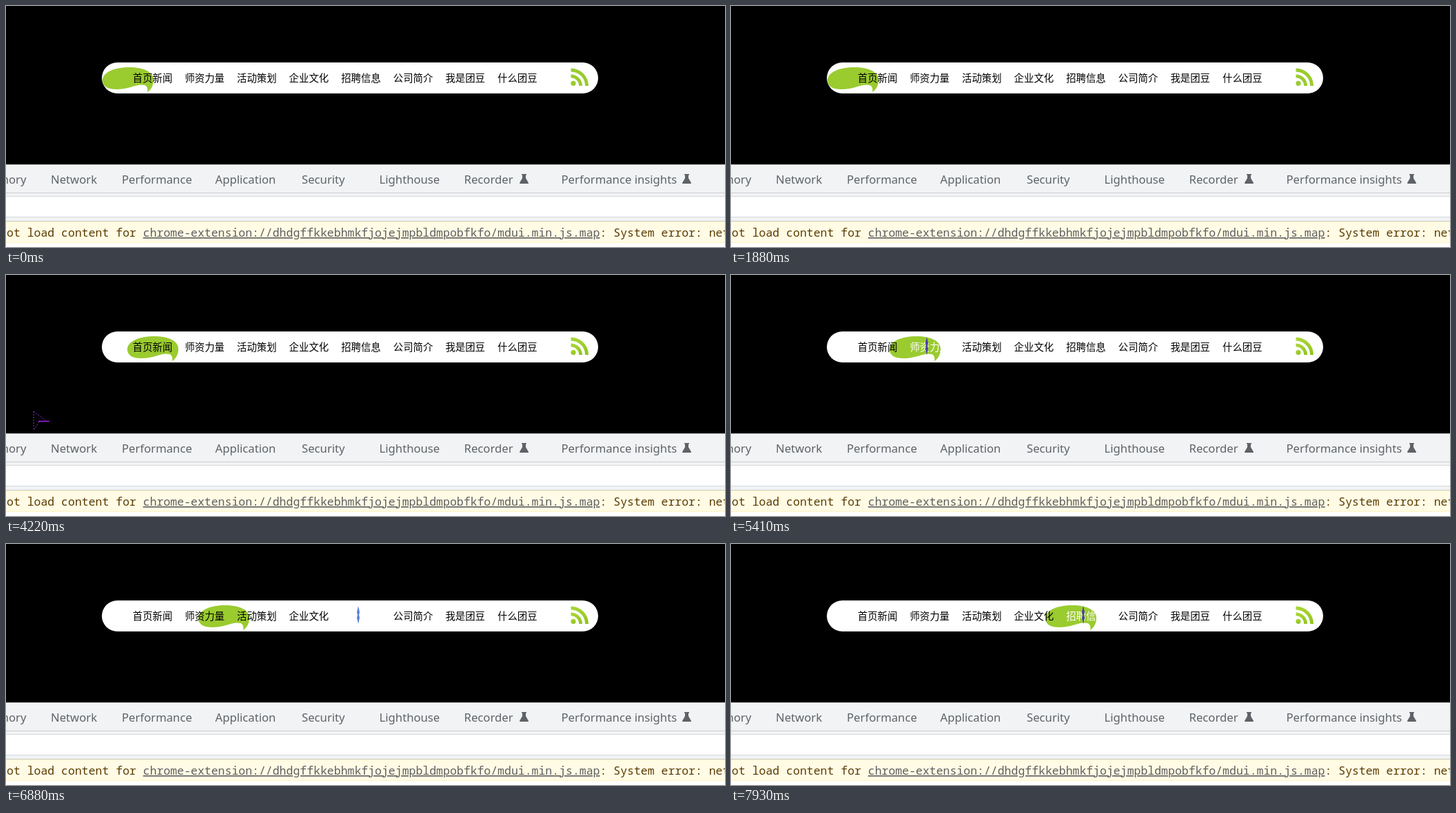
An HTML page for the animation above (8 s loop, 1043 by 350 pixels).

```html
<!DOCTYPE html>
<html lang="zh-CN">
<head>
<meta charset="utf-8">
<title>Navigation bar</title>
<style>
  html, body { margin: 0; width: 100%; height: 100%; overflow: hidden; background: #000; }
  svg { display: block; width: 1043px; height: 350px; }
  text { white-space: pre; }
  #nav { font: 350 14.4px "Noto Sans CJK SC", "Noto Sans CJK", sans-serif; }
  #tabs { font: 16.7px "Noto Sans", "Open Sans", sans-serif; fill: #5f6368; }
  #log text { font: 16.49px "Noto Sans Mono", "DejaVu Sans Mono", monospace; fill: #5c3c00; }
  #log .link { fill: #5f5f5f; text-decoration: underline 1px; }
  .line { fill: #cacdd1; }
</style>
</head>
<body>
<svg viewBox="0 0 1043 350">
  <defs>
    <linearGradient id="shine" x1="0" y1="0" x2="0" y2="1">
      <stop offset="0" stop-color="#a9d637"/>
      <stop offset="1" stop-color="#8fc41c"/>
    </linearGradient>
    <path id="flask" d="M3 0h7v1.500h-1v4.500l3.800 6.500q.5 1.500-1 1.500H1.200q-1.500 0-1-1.500L4 6V1.500H3z" fill="#5f6368"/>
  </defs>
  <rect width="1043" height="350"/>

  <rect x="139" y="82" width="720" height="45" rx="22.5" fill="#fff"/>
  <g id="art" fill="#9acb2f">
    <path id="bubble" d="M0 19C0 7 18 0 39 0C60 0 74 7 74 18C74 26 71 32 65 36C66 32 65 27 61 26C50 23 40 32 20 32C8 32 0 28 0 19Z"/>
    <g id="feed">
      <circle cx="823" cy="112.300" r="3.600"/>
      <path d="M819.500 99.500A16.500 16.500 0 0 1 836 116h-4.800A11.700 11.700 0 0 0 819.500 104.300z"/>
      <path d="M819.500 90.500A25.500 25.500 0 0 1 845 116h-4.900A20.600 20.600 0 0 0 819.500 95.400z"/>
    </g>
  </g>
  <g id="nav"></g>

  <rect y="230" width="1043" height="120" fill="#f1f3f4"/>
  <rect class="line" y="230" width="1043" height="1"/>
  <rect class="line" y="271" width="1043" height="1"/>
  <rect y="276" width="1043" height="31" fill="#d6d9dc"/>
  <rect y="277" width="1043" height="29" fill="#fff"/>
  <rect y="312" width="1043" height="38" fill="#fff"/>
  <rect class="line" y="312" width="1043" height="1"/>
  <g id="tabs">
    <text x="29.500" y="258" text-anchor="end">Memory</text>
    <text x="65" y="258">Network</text>
    <text x="168" y="258">Performance</text>
    <text x="303.500" y="258">Application</text>
    <text x="429" y="258">Security</text>
    <text x="541.500" y="258">Lighthouse</text>
    <text x="664.500" y="258">Recorder</text>
    <text x="805.500" y="258">Performance insights</text>
    <use href="#flask" x="745" y="244"/>
    <use href="#flask" x="981" y="244"/>
  </g>
  <g id="log">
    <rect y="313" width="1043" height="31" fill="#fff5c2"/>
    <rect y="314" width="1043" height="29" fill="#fffbe5"/>
    <text x="1" y="335">ot load content for <tspan class="link">chrome-extension://dhdgffkkebhmkfjojejmpbldmpobfkfo/mdui.min.js.map</tspan>: System error: net::ERR</text>
  </g>

  <g id="arrow">
    <path d="M1 0L18 13L9 15L2 26Z"/>
    <path d="M1 0V26M1 0L18 13M9 15L2 26" fill="none" stroke="#8a35d8" stroke-dasharray="2 2"/>
    <path d="M8 14.500H24" stroke="#a020f0" stroke-width="1.500"/>
  </g>
  <path id="beam" d="M0 0L2 9L1 13L2 17L0 26L-2 17L-1 13L-2 9Z"/>
</svg>
<script>
  const LOOP = 8000, STEP = 70, RATE = 0.0021;
  const CLEARED = 3210, RELOAD = 3280, LOADED = 3610, RETURN = 4220;
  const PITCH = 75.6, FIRST = 36;
  const $ = id => document.getElementById(id);
  const show = (el, on) => el.setAttribute('visibility', on ? 'visible' : 'hidden');
  const place = (el, x, y) => el.setAttribute('transform', `translate(${Math.round(x)} ${Math.round(y)})`);

  const labels = '首页新闻 师资力量 活动策划 企业文化 招聘信息 公司简介 我是团豆 什么团豆'.split(' ');
  const items = labels.map((label, i) => {
    const el = document.createElementNS('http://www.w3.org/2000/svg', 'text');
    el.textContent = label;
    el.setAttribute('x', 183.8 + i * PITCH);
    el.setAttribute('y', 110.3);
    $('nav').append(el);
    return el;
  });

  // Menu item under the pointer from each moment on; -1 is none
  const hovers = [{ at: 4820, item: 1 }, { at: 6100, item: -1 }, { at: 6675, item: 4 }];
  const [enter, leave, settle] = hovers.map(h => h.at);
  const spot = i => [208.5 + i * PITCH, 90];

  // Pointer trips; bulge bends the path, and a trip lasts until the pointer is gone
  const corner = [760, 335], rest = [198, 178], edge = [179, 148];
  const trips = [
    { at: 130, end: 900, from: corner, to: rest },
    { at: 900, end: 1740, from: rest, to: edge, bulge: [18, 0] },
    { at: 1740, end: 1810, from: edge, to: [51, 29], gone: 1880 },
    { at: 3880, end: 3950, from: [60, 46], to: [2, 147], gone: 4020 },
    { at: RETURN, end: enter, from: [39, 198], to: spot(1), bulge: [0, 55] },
    { at: leave, end: settle, from: spot(1), to: spot(4), bulge: [-100, 105] }
  ];

  function quantize(t) {
    const base = t < LOADED ? 130 : t < RETURN ? 3880 : RETURN;
    return base + Math.floor((t - base) / STEP) * STEP;
  }

  // The bubble closes a fixed share of the remaining gap per unit of time
  function bubbleAt(t) {
    return hovers.reduce((x, { at, item }, i) => {
      if (t < at) return x;
      const target = item < 0 ? 0 : FIRST + item * PITCH;
      const end = Math.min(t, hovers[i + 1]?.at ?? LOOP);
      return target + (x - target) * Math.exp(-RATE * (end - at));
    }, FIRST);
  }

  function pointerAt(t) {
    const trip = trips.findLast(m => t >= m.at);
    if (!trip || t >= trip.gone) return null;
    const { at, end, from, to, bulge = [0, 0] } = trip;
    const p = Math.min(1, (t - at) / (end - at));
    return from.map((a, k) => a + (to[k] - a) * p + bulge[k] * Math.sin(Math.PI * p));
  }

  function draw(now) {
    const real = now % LOOP, t = quantize(real);
    const loaded = real >= LOADED;
    const left = 140 + (loaded ? bubbleAt(t) : 0);
    show($('log'), real < CLEARED || loaded);
    show($('art'), real < RELOAD || loaded);
    $('feed').setAttribute('fill', loaded ? 'url(#shine)' : '#9acb2f');
    place($('bubble'), left, 89);

    const hovered = hovers.findLast(h => t >= h.at)?.item ?? -1;
    items.forEach((el, i) => el.setAttribute('fill', i === hovered ? '#fff' : '#000'));

    const pos = pointerAt(t);
    const onBar = pos && pos[1] > 80 && pos[1] < 118 && pos[0] > 139;
    show($('arrow'), pos && !onBar);
    show($('beam'), onBar);
    if (!pos) return;
    place($('arrow'), ...pos);
    place($('beam'), ...pos);
    const covered = pos[0] > left && pos[0] < left + 74;
    $('beam').setAttribute('fill', covered ? '#4a3fa0' : '#5b7fe0');
  }

  function tick() {
    draw(performance.now());
    requestAnimationFrame(tick);
  }
  tick();
</script>
</body>
</html>
```
